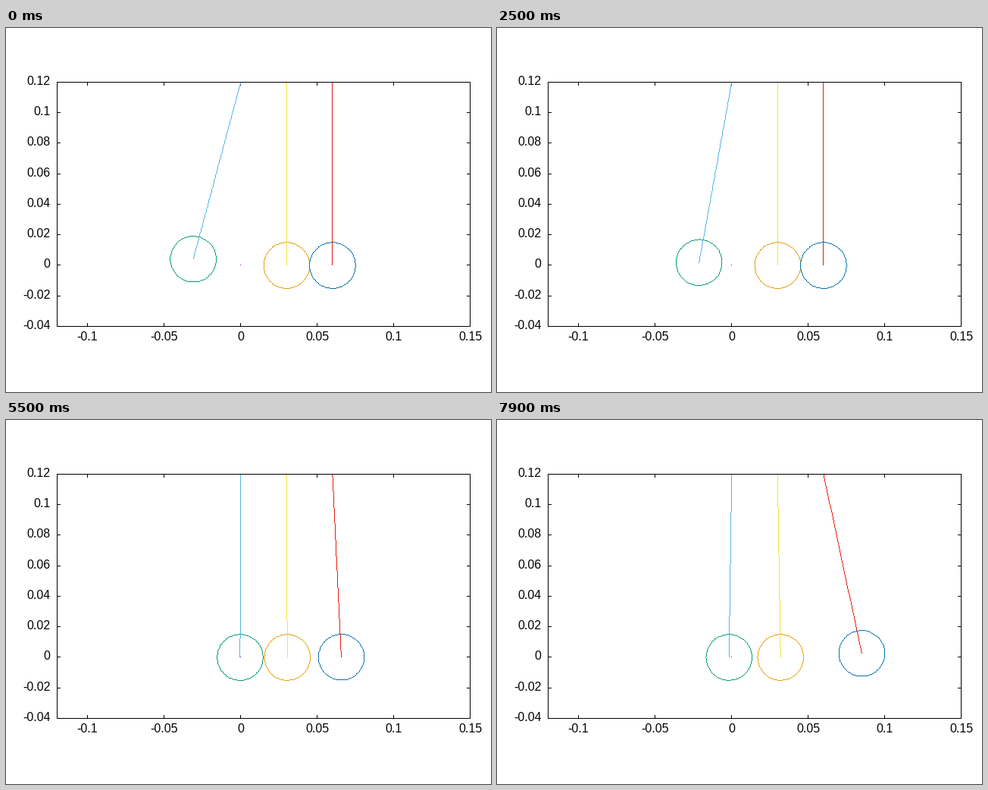
A matplotlib script for the animation above (8 s loop, 640x480 px).

```python
import numpy as np
import matplotlib.pyplot as plt
from matplotlib.animation import FuncAnimation
from matplotlib.collections import PolyCollection

W, H, DPI = 640, 480, 100
FRAMES, STEP = 80, 100

# Plot box in pixels and its data range
LEFT, RIGHT, TOP, BOTTOM = 67, 612, 71, 393
XMIN, XMAX, YMIN, YMAX = -0.12, 0.15, -0.04, 0.12

# Newton's cradle with three balls
LENGTH, RADIUS = 0.12, 0.015
PIVOTS = (0, 0.03, 0.06)
SWING = np.radians(15)
OMEGA = 0.0315                # radians per frame
HIT, RELEASE = 48.87, 49.1    # soft contact begins and ends, in frames
BEFORE = (1, 0, 0)
AFTER = (-0.0687, 0.0771, 0.992)

BALL_COLORS = ("#009e73", "#e69f00", "#0072b2")
ROD_COLORS = ("#56b4e9", "#f0e442", "#e51e10")

plt.rcParams["font.family"] = "Liberation Sans"
plt.rcParams["text.hinting"] = "native"
fig = plt.figure(figsize=(W / DPI, H / DPI), dpi=DPI, facecolor="white")
ax = fig.add_axes([0, 0, 1, 1])
ax.set_xlim(0, W)
ax.set_ylim(H, 0)
ax.axis("off")


def to_px(x, y):
    px = LEFT + (np.asarray(x) - XMIN) * (RIGHT - LEFT) / (XMAX - XMIN)
    py = BOTTOM - (np.asarray(y) - YMIN) * (BOTTOM - TOP) / (YMAX - YMIN)
    return np.floor(px + 0.5), np.ceil(py - 0.5 - 1e-9)


def trace(xs, ys):
    """Unit squares along a polyline: a crisp one-pixel stroke."""
    cells = []
    for x0, y0, x1, y1 in zip(xs[:-1], ys[:-1], xs[1:], ys[1:]):
        n = int(max(abs(x1 - x0), abs(y1 - y0))) + 1
        cells.append(np.column_stack([np.linspace(x0, x1, n),
                                      np.linspace(y0, y1, n)]))
    cells = np.unique(np.floor(np.concatenate(cells) + 0.5), axis=0)
    square = np.array([[0, 0], [1, 0], [1, 1], [0, 1]])
    return cells[:, None, :] + square


def stroke(color, z, verts=()):
    line = PolyCollection(verts, facecolors=color, edgecolors="none",
                          linewidths=0, antialiaseds=False, zorder=z)
    line.set_snap(False)
    ax.add_collection(line, autolim=False)
    return line


def label(x, y, value, align):
    ax.text(x, y, f"{value:g}", ha=align, va="baseline",
            fontsize=16 * 72 / DPI, color="black")


def draw_axes():
    ticks = []
    for i in range(-2, 4):
        x, _ = to_px(i * 0.05, 0)
        ticks += [trace((x, x), (TOP, TOP + 4)),
                  trace((x, x), (BOTTOM, BOTTOM - 4))]
        label(x + 0.5, 412, i * 0.05, "center")
    for i in range(-2, 7):
        _, y = to_px(0, i * 0.02)
        ticks += [trace((LEFT, LEFT + 4), (y, y)),
                  trace((RIGHT, RIGHT - 4), (y, y))]
        label(58.5, y + 4, i * 0.02, "right")
    stroke("black", 1, np.concatenate(ticks))
    stroke("black", 20, trace((LEFT, RIGHT, RIGHT, LEFT, LEFT),
                              (TOP, TOP, BOTTOM, BOTTOM, TOP)))


draw_axes()
ox, oy = to_px(0, 0)
stroke("#9400d3", 2, trace((ox, ox), (oy, oy)))

balls = [stroke(c, 3 + 2 * i) for i, c in enumerate(BALL_COLORS)]
rods = [stroke(c, 4 + 2 * i) for i, c in enumerate(ROD_COLORS)]
turn = np.linspace(0, 2 * np.pi, 100)
along = np.linspace(0, 1, 100)


def update(n):
    start, gains = (HIT, BEFORE) if n < RELEASE else (RELEASE, AFTER)
    phase = SWING * np.sin(OMEGA * (n - start))
    for pivot, gain, ball, rod in zip(PIVOTS, gains, balls, rods):
        angle = gain * phase
        dx, dy = LENGTH * np.sin(angle), LENGTH * np.cos(angle)
        ball.set_verts(trace(*to_px(pivot + dx + RADIUS * np.cos(turn),
                                    LENGTH - dy + RADIUS * np.sin(turn))))
        rod.set_verts(trace(*to_px(pivot + dx * along,
                                   LENGTH - dy * along)))
    return balls + rods


anim = FuncAnimation(fig, update, frames=FRAMES, interval=STEP,
                     repeat=True, repeat_delay=0, blit=False)
plt.show()
```
